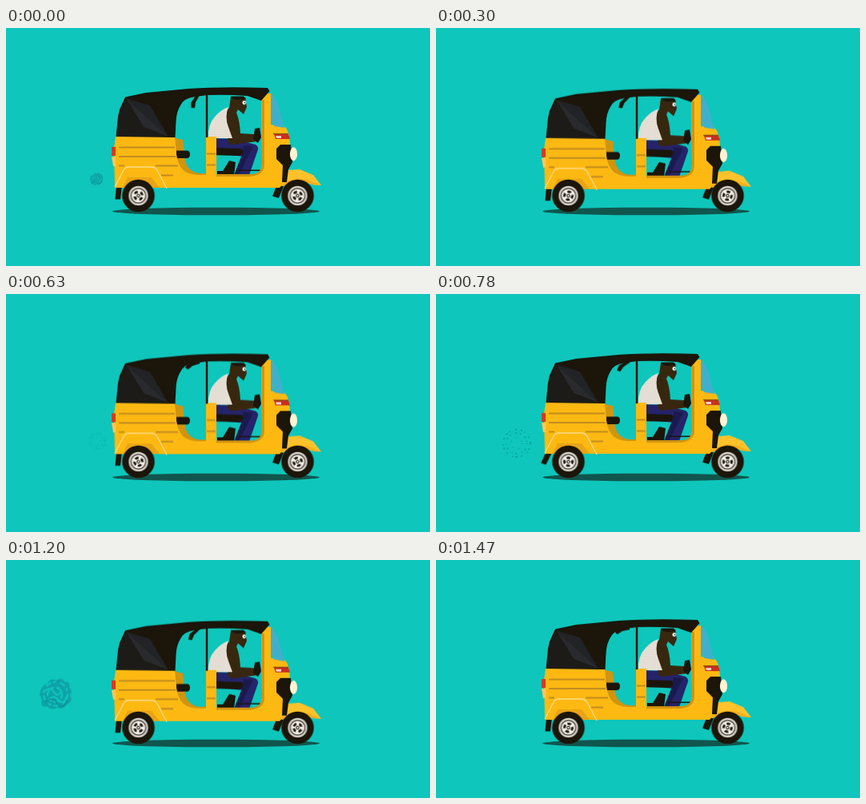
An HTML page without scripts for the animation above (1500 ms loop, 530x298 px).

```html
<!DOCTYPE html>
<html lang="en">
<head>
<meta charset="utf-8">
<title>Rickshaw</title>
<style>
html, body { margin: 0; width: 100%; height: 100%; overflow: hidden; background: #0ec6bb; }
svg { display: block; width: 100%; height: 100%; }
.ink { fill: #1b150a; }
.yellow { fill: #fdb912; }
.shade { fill: #d1940f; }
.skin { fill: #38270f; }
.bob { animation: bob 375ms ease-in-out infinite alternate; }
.rider { animation: bob 375ms ease-in-out infinite alternate; --drop: .6px; }
.wheel { animation: spin 750ms linear infinite; }
.flap { transform-origin: 142px 198px; animation: flap 1.5s ease-in-out infinite; }
.strap { transform-origin: 239px 86px; animation: strap 1.5s ease-in-out infinite; }
.puff { opacity: 0; animation: 1.5s linear infinite; }
.small { animation-name: small; }
.ring { animation-name: ring; }
.large { animation-name: large; }
@keyframes bob { to { transform: translateY(var(--drop, 1.9px)); } }
@keyframes spin { to { transform: rotate(1turn); } }
@keyframes flap {
  0%, 42%, 64%, 100% { transform: none; }
  52% { transform: rotate(20deg); }
}
@keyframes strap {
  0% { transform: rotate(24deg); }
  20% { transform: rotate(38deg); }
  34% { transform: rotate(78deg); }
  52% { transform: rotate(50deg); }
  66% { transform: rotate(68deg); }
  80% { transform: rotate(40deg); }
  98%, 100% { transform: rotate(72deg); }
}
@keyframes small {
  0% { transform: translate(113px, 189px) scale(.4); opacity: .85; }
  10% { transform: translate(108px, 190px) scale(.6); opacity: .5; }
  18%, 100% { transform: translate(104px, 191px) scale(.7); opacity: 0; }
}
@keyframes ring {
  0%, 36% { transform: translate(126px, 180px) scale(.2); opacity: 0; }
  42% { transform: translate(114px, 184px) scale(.6); opacity: .5; }
  52% { transform: translate(101px, 187px) scale(1); opacity: .75; }
  60%, 100% { transform: translate(93px, 188px) scale(1.1); opacity: 0; }
}
@keyframes large {
  0%, 66% { transform: translate(122px, 175px) scale(.2); opacity: 0; }
  71% { transform: translate(98px, 172px) scale(.5); opacity: .8; }
  80% { transform: translate(62px, 167.5px) scale(1); opacity: .8; }
  88% { transform: translate(61px, 169px) scale(1.06); opacity: .25; }
  94%, 100% { transform: translate(60px, 170px) scale(1.1); opacity: 0; }
}
</style>
</head>
<body>
<svg viewBox="0 0 530 298">
  <defs>
    <g id="wheel">
      <circle class="ink" r="20.3"/>
      <circle r="12.2" fill="#cfcac3"/>
      <circle r="9.2" fill="#f1ede6" stroke="#4a443b" stroke-width="1.3"/>
      <g class="wheel" fill="none" stroke="#241e15">
        <circle r="5" stroke-width="3" stroke-dasharray="4.4 3.454"/>
        <circle r="1.7" stroke-width="1.1"/>
      </g>
    </g>
    <g id="cloud">
      <path d="M-20 1Q-19 -10 -10 -13Q-7 -20 1 -17Q8 -22 11 -15Q19 -16 17 -8Q22 -4 18 2Q23 9 14 13Q10 20 2 17Q-5 22 -10 16Q-20 17 -17 8Z" fill="#109ba3"/>
      <g fill="none" stroke="#0ec6bb" stroke-width="2.2">
        <circle r="15" stroke-dasharray="7 3 4 5"/>
        <circle cx="-1" cy="1" r="9" stroke-dasharray="5 3 8 2"/>
        <path d="M-13 -4Q-6 -9 -2 -2T8 -4M-9 7Q-2 1 4 8T14 3"/>
      </g>
      <path d="M-14 10Q-3 2 2 12T15 9" fill="none" stroke="#0c858f" stroke-width="1.6"/>
    </g>
    <pattern id="knit" width="3" height="3" patternUnits="userSpaceOnUse">
      <rect width="3" height="3" fill="#e6e0d7"/>
      <circle cx="1" cy="1" r=".5" fill="#cdc6bc"/>
    </pattern>
  </defs>

  <rect width="530" height="298" fill="#0ec6bb"/>

  <use href="#cloud" class="puff small"/>
  <g class="puff ring" fill="none" stroke="#087f83">
    <circle r="17" stroke-width="1.4" stroke-dasharray="1.5 5 2 3 1 7"/>
    <circle r="13" stroke-width="1.2" stroke-dasharray="1 6 2 4"/>
    <circle r="7" stroke-width="1" stroke-dasharray="1 7"/>
  </g>
  <use href="#cloud" class="puff large"/>

  <ellipse cx="262.5" cy="229.5" rx="129.5" ry="4.8" fill="#10564e"/>

  <g class="bob">
    <path class="ink flap" d="M138 197H145L143 214.500H136.500Z"/>
    <path class="ink" d="M338 198H347L341 213L333 210.500Z"/>

    <!-- strap and cabin interior -->
    <g class="strap">
      <path class="ink" d="M237 83H241L240 93L242 100L238 102L235 96Z"/>
    </g>
    <path class="shade" d="M208 137L221 140L223 160Q225 181 243 182H251V187H222L209 178Z"/>
    <path class="ink" d="M213 153.500H227Q230 154 230 158Q230 163 226 163H213Z"/>

    <!-- driver -->
    <g class="rider">
      <path d="M258 138L286 139L312 146Q317 149 314 155L304 184H288L297 161L264 157Z" fill="#25236a"/>
      <path d="M297 147L309 148L291 184H285L294 161Z" fill="#1b1a4e"/>
      <path class="skin" d="M281 86L299 87L301 99L297 108L290 102L288 106Q292 115 293 132L310 133L316 136L314 142L282 146Q277 145 277 137L273 106L279 100Z"/>
      <path class="ink" d="M281 85.500H297L300 89L289 90L282 88Z"/>
      <circle cx="297.800" cy="93.500" r="2.400" fill="#f3eee6"/>
      <circle cx="298.500" cy="93.500" r=".8" fill="#1b160e"/>
      <path d="M253 138Q252 120 262 110Q269 102 278 99Q273 111 278 124L283 138Z" fill="url(#knit)"/>
      <path class="ink" d="M311 126L317 125L319 137L315 144L309 139Z"/>
    </g>
    <path class="ink" d="M255 151L260 150L294 151Q297 152 296 156Q295 160 290 160L255 159ZM279 166L287 168L285 184H264V179H271Z"/>
    <path d="M290 178.300H323" stroke="#1b160e" stroke-width="1.600"/>

    <!-- yellow body -->
    <path class="yellow" d="M137 136H211L213 158Q216 184 240 184H250V136H263V184H306Q320 183 320 169L319 82H331V121L347 123Q354 126 355 146L348 193L342 200H136L135 150Z"/>
    <path class="shade" d="M319.500 90L323 90V171Q323 184 306 186H263V183H306Q320 183 320 169Z"/>
    <path d="M141 149.500H211M141 161H212M141 172.500H148M187 172.500H215M194 184.500H209M251 157.500H262M251 171.500H262" stroke="#c28c20" stroke-width="2"/>
    <path d="M251 79V137" stroke="#1b160e" stroke-width="2.400"/>

    <!-- rear fender and lamps -->
    <path d="M152 187H182L192 200H146Z" fill="#e9a416"/>
    <path d="M136 199L147 178Q149 174 154 174H182Q186 174 189 178L201 201" fill="none" stroke="#ffdc86" stroke-width="1.300"/>
    <path d="M132 149H137V160H132Z" fill="#d63a22"/>
    <path d="M132 161H137V173H134Z" fill="#ffc45a"/>

    <!-- canopy -->
    <path class="ink" d="M137.500 136L140 111L142 102L149 86.500L175 81L228 76Q270 73 327 75L329.500 79L319 91L302 85Q275 83 252 84L236 86Q222 88 218 97Q213 105 212.500 117L211.500 137Z"/>
    <path d="M150 88L180 97L203 136Z" fill="#222326"/>
    <path d="M150 88L203 136L172 124Z" fill="#292a2d"/>
    <path d="M150 88L172 124L203 136H138L141 110Z" fill="#1c1b18"/>

    <!-- windscreen and nose -->
    <path d="M331 81Q339 87 342 103L348 125L336 123Q331 119 331 109Z" fill="#3fb0cc"/>
    <path d="M335 133H353L355 139H337Z" fill="#c9301f"/>
    <path d="M337 135H344V138H338Z" fill="#f4cfc4"/>
    <path d="M334 132.500H353" stroke="#86500f" stroke-width="1.200"/>
    <path d="M345 194L353 178L367 177L384 184L394 197L382 196Q368 188 345 198Z" fill="#ffc22a"/>
    <path d="M394 197L382 196Q368 188 345 198V194Q367 184 382 192Z" fill="#f8ae1c"/>
    <path class="ink" d="M338 151L343 146H356L358 168L353 177L351 193H345L346 172L338 164Z"/>
    <ellipse cx="359.500" cy="157.800" rx="4.600" ry="8.500" fill="#fff3d4"/>
  </g>

  <use href="#wheel" x="165.500" y="210"/>
  <use href="#wheel" x="364.500" y="210"/>
</svg>
</body>
</html>
```
